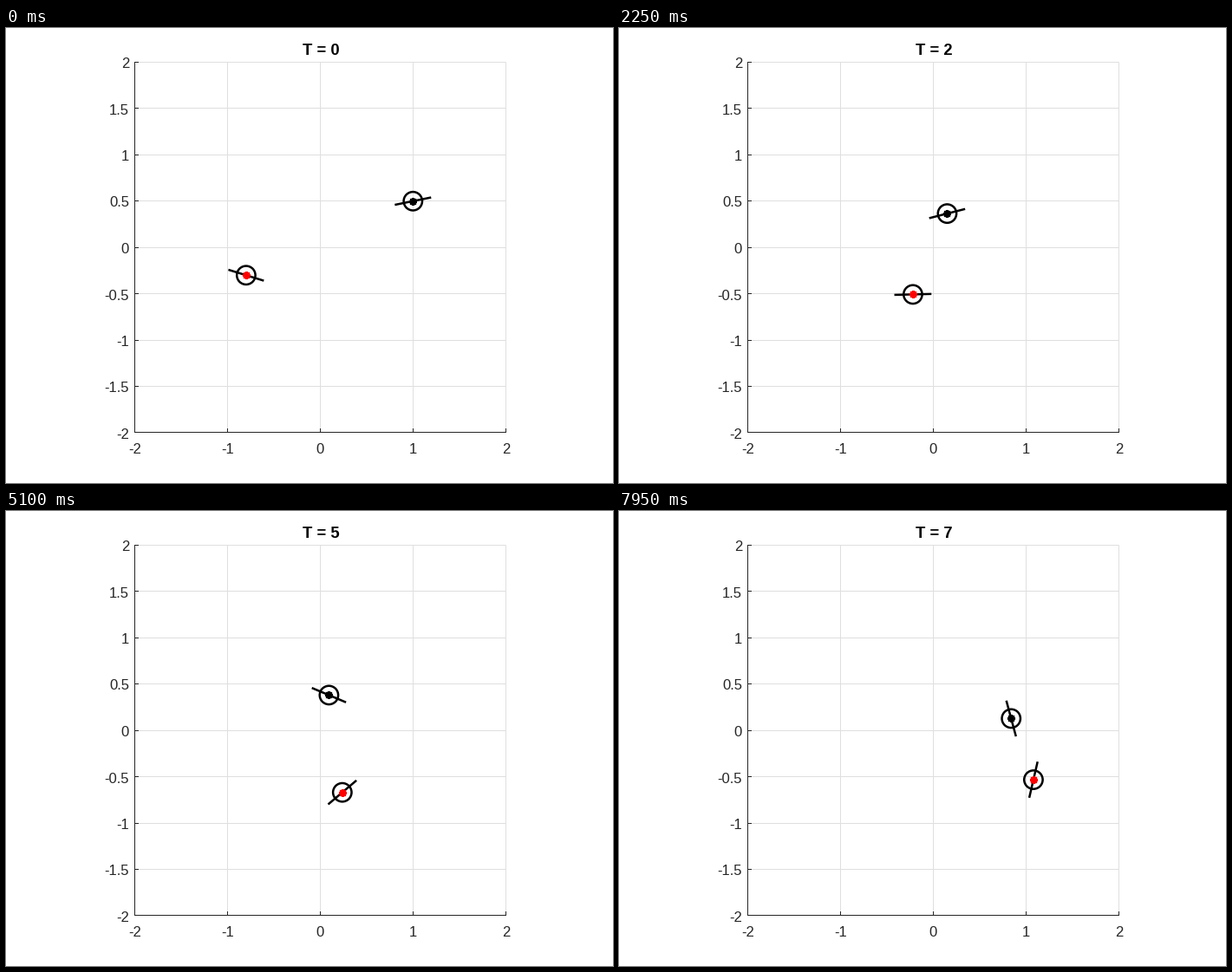
These frames come from a looping animation (700 by 525 pixels, 8 s). A matplotlib script:

```python
import numpy as np
import matplotlib.pyplot as plt
from matplotlib.animation import FuncAnimation
from matplotlib.patches import Circle

W, H, DPI = 700, 525, 100
STEP, FRAMES = 50, 160
DURATION = STEP * FRAMES / 1000
PT = 72 / DPI                      # one pixel in points
UNIT = 106.9                       # pixels per axis unit
INK, GRID = "#262626", "#dfdfdf"
ARM, RADIUS = 0.2, 0.1             # arm half length, body radius

plt.rcParams["font.family"] = "Liberation Sans"


def px(u):
    return 362.4 + UNIT * u


def py(v):
    return 253.2 - 106.85 * v


def centre(p):
    """Centre of the pixel that holds p, for crisp one-pixel lines."""
    return np.floor(p) + 0.5


def curve(*poses):
    """Smooth polynomial through poses spread evenly over the loop."""
    t = np.linspace(0, DURATION, len(poses))
    return np.poly1d(np.polyfit(t, poses, len(poses) - 1))


fig = plt.figure(figsize=(W / DPI, H / DPI), dpi=DPI, facecolor="white")
ax = fig.add_axes([0, 0, 1, 1])
ax.set_xlim(0, W)
ax.set_ylim(H, 0)
ax.axis("off")


def rule(x, y, color, z):
    ax.plot(x, y, color=color, lw=PT, zorder=z, snap=False,
            solid_capstyle="butt")


def draw_axes():
    left, right = centre(px(-2)), centre(px(2))
    top, bottom = centre(py(2)), centre(py(-2))
    for u in range(-2, 3):
        x = centre(px(u))
        rule([x, x], [top, bottom], GRID, 1)
        rule([x, x], [bottom, bottom - 4.5], INK, 2)
        ax.text(x, 491, str(u), size=12, color=INK, ha="center", va="baseline")
    for v in np.linspace(-2, 2, 9):
        y = centre(py(v))
        rule([left, right], [y, y], GRID, 1)
        rule([left, left + 4.5], [y, y], INK, 2)
        ax.text(142, 260 - 107 * v, f"{v:g}", size=12, color=INK,
                ha="right", va="baseline")
    rule([left, left], [top - 0.5, bottom + 0.5], INK, 2)
    rule([left - 0.5, right + 0.5], [bottom, bottom], INK, 2)


class Robot:
    def __init__(self, color, x, y, angle):
        self.path = x, y, angle
        self.body = Circle((0, 0), RADIUS * UNIT, fill=False, ec="black",
                           lw=2.5 * PT, zorder=3)
        ax.add_patch(self.body)
        self.arm, = ax.plot([], [], color="black", lw=2.5 * PT, zorder=4,
                            solid_capstyle="butt")
        self.star, = ax.plot([], [], marker=(8, 2, 0), ms=6.5, mew=1.5,
                             color=color, ls="none", zorder=5, snap=False)

    def move(self, t):
        x, y, angle = (f(t) for f in self.path)
        dx = ARM * np.cos(np.radians(angle))
        dy = ARM * np.sin(np.radians(angle))
        self.body.center = px(x), py(y)
        self.arm.set_data([px(x - dx), px(x + dx)], [py(y - dy), py(y + dy)])
        self.star.set_data([px(x)], [py(y)])


draw_axes()
title = ax.text(363, 31, "", size=13.2, weight="bold", color="black",
                ha="center", va="baseline")

robots = [
    Robot("black",
          x=curve(1, 0.21, -0.015, 0.28, 0.855),
          y=curve(0.5, 0.378, 0.372, 0.386, 0.313, 0.122),
          angle=curve(11.5, 15.7, -4.6, -39.8, -75.7)),
    Robot("red",
          x=curve(-0.8, -0.327, -0.091, 0.172, 0.592, 1.095),
          y=curve(-0.3, -0.485, -0.632, -0.666, -0.526),
          angle=curve(-17.2, -1.4, 24.4, 53.1, 77.5)),
]


def update(frame):
    t = frame * STEP / 1000
    for robot in robots:
        robot.move(t)
    title.set_text(f"T = {int(t)}")
    return []


anim = FuncAnimation(fig, update, frames=FRAMES, interval=STEP,
                     init_func=lambda: update(0), repeat=True, repeat_delay=0)
plt.show()
```
